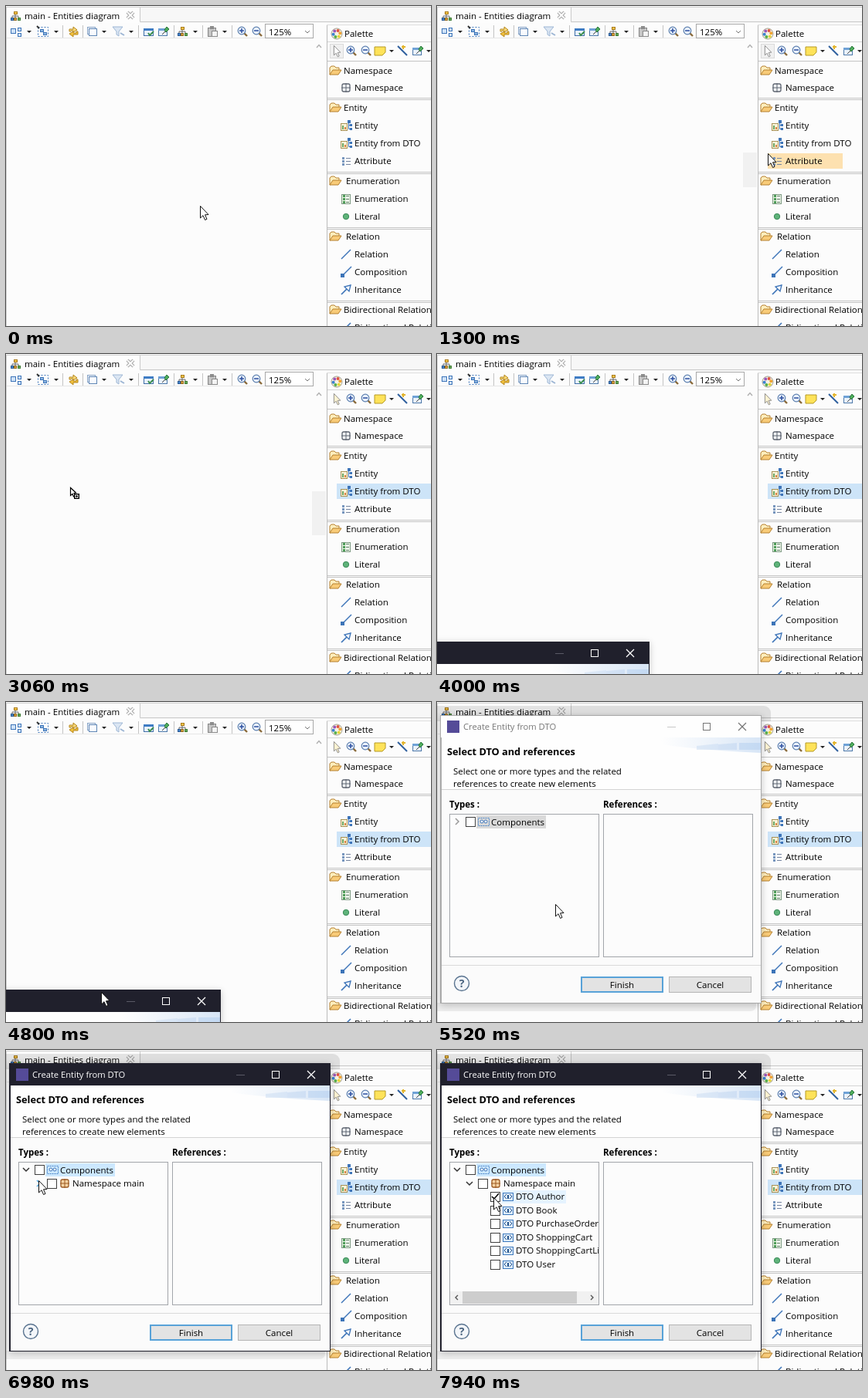
An HTML page with a canvas that plays this animation: 550x415 px, repeating every 8000 ms.

```html
<!DOCTYPE html>
<html lang="en">
<head>
<meta charset="utf-8">
<title>Entities diagram</title>
<style>
html, body { margin: 0; width: 100%; height: 100%; overflow: hidden; background: #fcfcfc; }
canvas { display: block; width: 550px; height: 415px; }
</style>
</head>
<body>
<canvas id="stage" width="550" height="415"></canvas>
<script>
const ctx = document.getElementById('stage').getContext('2d');
const LOOP = 8000;
const BLUE = '#3d74b8', INK = '#000';

// Pointer moves: start, end, number of steps, final x, final y.
const MOVES = [
  [400, 640, 3, 262, 254], [790, 910, 2, 348, 229], [1060, 1300, 3, 428, 191],
  [1450, 1570, 2, 441, 180], [2150, 2630, 5, 144, 175], [2790, 2790, 1, 127, 175],
  [2940, 3060, 2, 83, 173], [3730, 3850, 2, 20, 265], [4000, 4000, 1, 468, 416],
  [4250, 4490, 3, 120, 376], [4800, 4800, 1, 123, 376], [4940, 4940, 1, 206, 171],
  [5070, 5070, 1, 180, 277], [5520, 5520, 1, 153, 262], [5670, 5790, 2, 59, 178],
  [5940, 6190, 3, 25, 151], [6740, 6980, 3, 42, 169], [7400, 7520, 2, 62, 187],
  [7670, 7790, 2, 73, 191]
];

function pointerAt(t) {
  let x = 251, y = 259;
  for (const [start, end, steps, tx, ty] of MOVES) {
    if (t < start) break;
    const gap = (end - start) / Math.max(1, steps - 1);
    const done = t >= end ? 1 : (Math.floor((t - start) / gap) + 1) / steps;
    x += (tx - x) * done;
    y += (ty - y) * done;
  }
  return [Math.round(x), Math.round(y)];
}

function rect(x, y, w, h, fill, stroke, width = 1) {
  if (fill) { ctx.fillStyle = fill; ctx.fillRect(x, y, w, h); }
  if (stroke) {
    ctx.strokeStyle = stroke; ctx.lineWidth = width;
    ctx.strokeRect(x + width / 2, y + width / 2, w - width, h - width);
  }
}
function shape(points, fill, stroke, width = 1, close = true) {
  ctx.beginPath();
  for (let i = 0; i < points.length; i += 2) ctx.lineTo(points[i], points[i + 1]);
  if (close) ctx.closePath();
  if (fill) { ctx.fillStyle = fill; ctx.fill(); }
  if (stroke) { ctx.strokeStyle = stroke; ctx.lineWidth = width; ctx.stroke(); }
}
const line = (points, color, width) => shape(points, null, color, width, false);
function circle(x, y, r, fill, stroke, width = 1) {
  ctx.beginPath();
  ctx.arc(x, y, r, 0, Math.PI * 2);
  if (fill) { ctx.fillStyle = fill; ctx.fill(); }
  if (stroke) { ctx.strokeStyle = stroke; ctx.lineWidth = width; ctx.stroke(); }
}
function text(str, x, y, { color = INK, size = 11.5, bold = false, align = 'left' } = {}) {
  ctx.font = `${bold ? 'bold ' : ''}${size}px "Open Sans", "Noto Sans", sans-serif`;
  ctx.textAlign = align;
  ctx.fillStyle = color;
  ctx.fillText(str, x, y);
}
function at(x, y, draw) {
  ctx.save();
  ctx.translate(x, y);
  draw();
  ctx.restore();
}

// Icons are drawn around their own centre.
const icons = {
  tree() {
    line([-4, 2, -4, 0, 4, 0, 4, 2], '#666');
    line([0, -2, 0, 2], '#666');
    rect(-2, -6, 5, 4, '#f3c54a', '#a87a1c');
    rect(-6, 2, 4, 4, '#4b87c9', '#2a5a94');
    rect(-2, 2, 4, 4, '#d9a441', '#94681e');
    rect(3, 2, 4, 4, '#69ab59', '#3d7a33');
  },
  layout() {
    rect(-7, -4, 7, 7, '#cfe2f7', BLUE);
    rect(2, -5, 5, 5, '#cfe2f7', BLUE);
    rect(2, 2, 5, 5, '#cfe2f7', BLUE);
  },
  select() {
    ctx.setLineDash([2, 2]);
    rect(-7, -6, 14, 13, null, BLUE);
    ctx.setLineDash([]);
    rect(-4, -3, 5, 4, '#8fb7e2', BLUE);
    rect(0, 1, 5, 4, '#8fb7e2', BLUE);
    line([-8, -7, -5, -4], '#333', 2);
  },
  refresh() {
    shape([-5, 0, -5, -3, 0, -3, 0, -6, 5, -2, 0, 1, 0, -1, -3, -1, -3, 0], '#f8d978', '#b5861c');
    shape([6, 0, 6, 4, 0, 4, 0, 7, -5, 3, 0, 0, 0, 2, 4, 2, 4, 0], '#f2c23e', '#b5861c');
  },
  layers() {
    rect(-7, -6, 11, 10, '#f1f5fb', '#86a3c6');
    rect(-5, -4, 11, 10, '#f9fbff', '#5f86b5');
  },
  filter() {
    shape([-8, -6, 5, -6, 0, 0, 0, 6, -3, 4, -3, 0], '#dbe6f3', '#9db6d4');
    line([2, 2, 7, 5], '#9db6d4', 2);
  },
  check() {
    rect(-7, -4, 13, 10, '#eaf2fc', '#3e6da6');
    rect(-7, -4, 13, 3, '#3e7cc4');
    line([-1, 2, 1, 5, 6, 0], '#3c8f50', 2);
  },
  pin() {
    rect(-7, -4, 12, 10, '#eaf2fc', '#4d78a8');
    rect(-7, -4, 12, 3, '#6fa1d6');
    line([-2, 4, 2, 0], '#444');
    shape([1, -2, 4, -6, 7, -3, 3, 1], '#4fae5c', '#28743a');
  },
  clipboard() {
    rect(-6, -5, 11, 12, '#c6c6c6', '#858585');
    rect(-3, -7, 5, 4, '#8d8d8d');
    rect(-1, -1, 8, 8, '#f4f4f4', '#8a8a8a');
  },
  zoomIn() { zoom(true); },
  zoomOut() { zoom(false); },
  wheel() {
    circle(0, 0, 7, '#f6f2e4', '#a5a08e');
    ['#e0533f', '#f0a232', '#e6d63c', '#58b04c', '#3c82d2', '#9a57b8'].forEach((color, i) => {
      const a = i * Math.PI / 3 - 1.2;
      circle(Math.cos(a) * 4.4, Math.sin(a) * 4.4, 2, color);
    });
  },
  note() { shape([-7, -5, 7, -5, 7, 2, 3, 6, -7, 6], '#ffe35a', '#b59a25'); },
  wand() {
    line([-6, -6, 6, 6], '#2f5f9e', 2);
    line([-1, -5, 4, -5], '#e3b52d', 2);
    line([1, -7, 1, -2], '#e3b52d', 2);
  },
  folder() {
    shape([-7, 5, -7, -4, -5, -6, -1, -6, 1, -4, 5, -4, 5, 0], '#ffeebd', '#b5802f');
    shape([-7, 5, -3, -1, 8, -1, 4, 5], '#f8cb78', '#b5802f');
  },
  namespace(color = '#5d6470', fill = '#f4f6f8') {
    ctx.beginPath();
    ctx.roundRect(-5, -5, 10, 10, 2);
    ctx.fillStyle = fill; ctx.fill();
    ctx.strokeStyle = color; ctx.lineWidth = 1.3; ctx.stroke();
    line([-6, 0, 6, 0], color);
    line([0, -6, 0, 6], color);
  },
  entity() {
    rect(-7, -3, 9, 10, '#fbf3d8', '#a89257');
    rect(-5, 0, 2, 5, '#6aa562');
    rect(-2, 2, 2, 3, '#d6803c');
    line([3.5, -5, 3.5, 4.5, 6, 4.5], BLUE);
    line([3.5, -.5, 6, -.5], BLUE);
    rect(2, -7, 4, 4, BLUE);
    rect(5, -2, 3, 3, BLUE);
    rect(5, 3, 3, 3, BLUE);
  },
  attribute() {
    for (const y of [-5, -1, 3]) {
      rect(-5, y, 3, 3, '#7796bd');
      rect(0, y + 1, 6, 1, '#7484a0');
    }
  },
  enumeration() {
    rect(-6, -6, 12, 13, '#eff6e9', '#7d9a83');
    for (const y of [-4, 0, 4]) {
      rect(-4, y - 1, 3, 3, '#4d9c58');
      rect(0, y, 4, 1, '#60806a');
    }
  },
  literal() { circle(0, 0, 3.7, '#5fb37a', '#3a8a58'); },
  relation() { line([-6, 6, 6, -6], BLUE, 1.5); },
  composition() {
    line([-5, 5, 7, -7], BLUE, 1.5);
    rect(-7, 2, 5, 5, BLUE);
  },
  inheritance() {
    line([-6, 6, 3, -3], BLUE, 1.7);
    shape([6, -6, 4, 2, -2, -4], '#fff', BLUE, 1.3);
  },
  components() {
    ctx.setLineDash([2, 1]);
    rect(-7, -5, 15, 11, null, '#4a85c6');
    ctx.setLineDash([]);
    circle(-2, 0, 2, '#fff', BLUE);
    circle(3, 0, 2, '#fff', BLUE);
  },
  dto() {
    rect(-7, -5, 14, 11, '#dcebfb', '#3d79bd');
    line([-2, -3, -5, 0, -2, 3], '#24538c');
    line([2, -3, 5, 0, 2, 3], '#24538c');
    rect(-1, -2, 2, 5, '#24538c');
  }
};
function zoom(plus) {
  line([2, 2, 6, 6], '#8a6a3a', 2.4);
  circle(-1, -1, 4.8, '#eaf2fc', '#5c7fae', 1.2);
  line([-4, -1, 2, -1], '#2d4fa0', 1.5);
  if (plus) line([-1, -4, -1, 2], '#2d4fa0', 1.5);
}
const icon = (name, x, y, ...args) => at(x, y, () => icons[name](...args));
const dropdown = (x, y) => shape([x - 3, y - 1, x + 3, y - 1, x, y + 2], '#222');

function drawEditor() {
  rect(0, 0, 550, 415, '#fcfcfc');
  rect(0, 0, 550, 22, '#f7f7f7');
  rect(0, 1, 173, 21, '#fdfdfd');
  line([0, 1.5, 550, 1.5], '#d2d2d2');
  line([173.5, 2, 173.5, 20.5, 550, 20.5], '#c9c9c9');
  icon('tree', 12, 13);
  text('main - Entities diagram', 24, 17);
  for (const [color, width] of [['#a8a8a8', 4], ['#fdfdfd', 2]]) {
    line([157, 8, 165, 16], color, width);
    line([165, 8, 157, 16], color, width);
  }

  const bar = { layout: 13, select: 48, refresh: 87, layers: 112, filter: 146, check: 185,
    pin: 204, tree: 228, clipboard: 267, zoomIn: 306, zoomOut: 325 };
  for (const name in bar) icon(name, bar[name], 33);
  for (const x of [30, 65, 127, 162, 245, 283]) dropdown(x, 33);
  for (const x of [73, 99, 171, 217, 254, 292]) line([x + .5, 25, x + .5, 42], '#c4c4c4');
  rect(335, 23, 63, 19, '#fff', '#a8a8a8');
  text('125%', 340, 38);
  line([387, 32, 390, 35, 393, 32], '#777');
  line([0, 41.5, 335, 41.5], '#e6e6e6');
  line([.5, 1, .5, 415], '#cfcfcf');
  line([402, 54, 405, 50.5, 408, 54], '#b0b0b0', 1.4);
}

const DRAWERS = [
  { title: 'Namespace', x: 437, y: 84, end: 120, items: [['namespace', 'Namespace']] },
  { title: 'Entity', x: 437, y: 132, end: 216,
    items: [['entity', 'Entity'], ['entity', 'Entity from DTO'], ['attribute', 'Attribute']] },
  { title: 'Enumeration', x: 440, y: 227, end: 288,
    items: [['enumeration', 'Enumeration'], ['literal', 'Literal']] },
  { title: 'Relation', x: 440, y: 299, end: 383,
    items: [['relation', 'Relation'], ['composition', 'Composition'], ['inheritance', 'Inheritance']] },
  { title: 'Bidirectional Relation', x: 437, y: 394, end: 430,
    items: [['relation', 'Bidirectional Relation']] }
];

function drawPalette(t) {
  rect(415, 24, 135, 391, '#fcfcfc');
  line([415.5, 24, 415.5, 415], '#bcbcbc');
  line([415, 24.5, 550, 24.5], '#dedede');
  line([416, 46.5, 550, 46.5], '#d5d5d5');
  line([416, 71.5, 550, 71.5], '#c4c4c4');
  icon('wheel', 428, 36);
  text('Palette', 438, 40);
  const picked = t >= 1880;
  if (!picked) rect(419, 49, 18, 19, '#f0f0f0', '#dadada');
  at(424, 51, () => arrow(picked ? '#fdf3d2' : '#fff', '#777', .8));
  icon('zoomIn', 447, 58);
  icon('zoomOut', 466, 58);
  icon('note', 484, 58);
  icon('wand', 513, 58);
  icon('pin', 533, 58);
  dropdown(499, 58);
  dropdown(547, 58);

  if (t >= 1300 && t < 1450) rect(428, 191, 97, 20, '#fde1b0');
  if (t >= 1450) rect(428, 168, 122, 20, picked ? '#cde4f8' : '#fde1b0');

  for (const d of DRAWERS) {
    icon('folder', 426, d.y);
    text(d.title, d.x, d.y + 4);
    d.items.forEach(([name, label], i) => {
      const y = d.y + 23 * (i + 1) - (d.title === 'Namespace' ? 1 : 0);
      icon(name, 440, y);
      text(label, 451, y + 4);
    });
    line([416, d.end - .5, 550, d.end - .5], '#c4c4c4');
    line([416, d.end + 1.5, 550, d.end + 1.5], '#c4c4c4');
  }
}

function checkbox(x, y) { rect(x - 6, y - 6, 13, 13, '#fff', '#404040'); }
function chevron(x, y, open, color) {
  line(open ? [x - 4, y - 2, x, y + 2, x + 4, y - 2] : [x - 2, y - 4, x + 2, y, x - 2, y + 4], color, 1.5);
}

function drawTypes(t) {
  const open = t >= 6330, deep = t >= 7130;
  ctx.save();
  ctx.beginPath();
  ctx.rect(17, 146, 192, 184);
  ctx.clip();
  rect(51, 147, 90, 17, t >= 5940 ? '#cce8ff' : '#d9d9d9');
  chevron(26, 155, open, open ? '#333' : '#9a9a9a');
  checkbox(43, 155);
  icon('components', 60, 155);
  text('Components', 70, 160);
  if (open) {
    chevron(42, 173, deep, deep ? '#333' : t >= 6980 ? '#4aa3e0' : '#9a9a9a');
    checkbox(59, 173);
    icon('namespace', 76, 173, '#9c5a22', '#f5d3a4');
    text('Namespace main', 86, 177);
  }
  if (deep) {
    if (t >= 7670) rect(84, 182, 83, 17, '#e5f3ff');
    ['Author', 'Book', 'PurchaseOrder', 'ShoppingCart', 'ShoppingCartLine', 'User'].forEach((name, i) => {
      const y = Math.round(190 + i * 17.5);
      checkbox(75, y);
      icon('dto', 92, y);
      text('DTO ' + name, 102, y + 4);
    });
    if (t >= 7940) line([71, 190, 74, 193, 80, 186], INK, 1.5);
    rect(17, 313, 192, 17, '#f1f1f1');
    rect(33, 313, 148, 16, '#cdcdcd');
    line([27, 318, 24, 321, 27, 324], '#555', 1.4);
    line([199, 318, 202, 321, 199, 324], '#555', 1.4);
  }
  ctx.restore();
}

function button(label, x, w, border, width) {
  rect(x, 356, w, 21, '#e3e3e3', border, width);
  text(label, x + w / 2, 371, { align: 'center' });
}

function drawBanner() {
  const sky = ctx.createLinearGradient(290, 0, 419, 0);
  sky.addColorStop(0, 'rgba(214,228,246,0)');
  sky.addColorStop(1, 'rgba(205,223,244,.8)');
  ctx.beginPath();
  ctx.moveTo(230, 46);
  ctx.quadraticCurveTo(320, 62, 419, 66);
  ctx.lineTo(419, 46);
  ctx.fillStyle = sky;
  ctx.fill();
  shape([336, 57, 364, 54, 364, 62, 336, 62], 'rgba(190,212,240,.4)');
  shape([364, 55, 388, 53, 388, 62, 364, 62], 'rgba(180,206,238,.4)');
  shape([391, 53, 419, 53, 419, 62, 391, 62], 'rgba(165,197,234,.4)');
}

function drawDialog(t, docked) {
  const dark = !docked || t >= 6330;
  const fore = dark ? '#fff' : '#777';
  if (docked) {
    ctx.fillStyle = 'rgba(0,0,0,.1)';
    ctx.beginPath();
    ctx.roundRect(-8, 5, 440, 20, [9, 9, 0, 0]);
    ctx.fill();
    ctx.fillStyle = 'rgba(0,0,0,.06)';
    ctx.beginPath();
    ctx.roundRect(-8, 390, 421, 11, [0, 0, 7, 7]);
    ctx.fill();
  }
  ctx.save();
  ctx.shadowColor = 'rgba(0,0,0,.22)';
  ctx.shadowBlur = 9;
  ctx.shadowOffsetY = 2;
  rect(4, 17, 416, 374, dark ? '#20202c' : '#a9a9a9');
  ctx.restore();
  rect(5, 18, 414, 28, dark ? '#20202c' : '#fefefe');
  rect(6, 46, 413, 344, '#fbfbfb');
  rect(6, 46, 413, 67, '#fefefe');
  drawBanner();

  if (docked) {
    rect(13, 24, 16, 16, '#554b98');
    text('Create Entity from DTO', 34, 36, { color: dark ? '#fff' : '#777', size: 11.2 });
  }
  line([298, 32.5, 309, 32.5], dark ? '#5a5a66' : '#c8c8c8');
  rect(344, 27, 10, 10, null, fore);
  line([390, 27, 400, 37], fore, 1.2);
  line([400, 27, 390, 37], fore, 1.2);

  text('Select DTO and references', 13, 69, { bold: true, size: 12.75 });
  text('Select one or more types and the related', 21, 94);
  text('references to create new elements', 21, 110);
  line([6, 113.5, 419, 113.5], '#d4d4d4');
  text('Types :', 16, 137, { bold: true });
  text('References :', 215, 137, { bold: true });
  rect(16, 145, 194, 186, '#fcfcfc', '#a2a5aa');
  rect(215, 145, 194, 186, '#fcfcfc', '#a2a5aa');
  line([6, 341.5, 419, 341.5], '#dadada');
  drawTypes(t);
  circle(32, 365, 9.5, '#f3f6fa', '#59738f', 1.4);
  text('?', 32, 370, { bold: true, size: 14, align: 'center', color: '#49637f' });
  button('Finish', 186, 107, '#58a2d8', 2);
  button('Cancel', 300, 107, '#b4b4b4', 1);
}

function arrow(fill = '#fff', stroke = '#111', scale = 1) {
  ctx.scale(scale, scale);
  shape([.5, .5, .5, 16, 4, 12.7, 6.6, 18.5, 9, 17.4, 6.5, 11.8, 11, 11.5], fill, stroke);
}
function addPointer() {
  shape([.5, .5, .5, 10.5, 3, 8.5, 4.5, 12, 6.5, 11, 5, 7.5, 7.5, 7], '#fff', '#000', 1.2);
  rect(5, 8, 7, 7, '#fff', '#000', 1.4);
  rect(8, 10, 1, 3, '#000');
  rect(7, 11, 3, 1, '#000');
}

function draw(t) {
  drawEditor();
  if (t >= 1300 && t < 3310) {
    const top = t < 2150 ? 190 : 178;
    rect(396, top, 18, 235 - top, '#f1f1f1');
  }
  drawPalette(t);
  if (t >= 3310) {
    const [dx, dy] = t < 4800 ? [-145, 356] : t < 4940 ? [-142, 356] : t < 5070 ? [-59, 151] : [0, 0];
    ctx.globalAlpha = t < 3460 ? .6 : 1;
    at(dx, dy, () => drawDialog(t, t >= 5070));
    ctx.globalAlpha = 1;
  }
  const [x, y] = pointerAt(t);
  const adding = t >= 2150 && t < 3310 && x < 414;
  at(x, y, () => adding ? addPointer() : arrow());
}

function tick(now) {
  draw(now % LOOP);
  requestAnimationFrame(tick);
}
requestAnimationFrame(tick);
</script>
</body>
</html>
```
